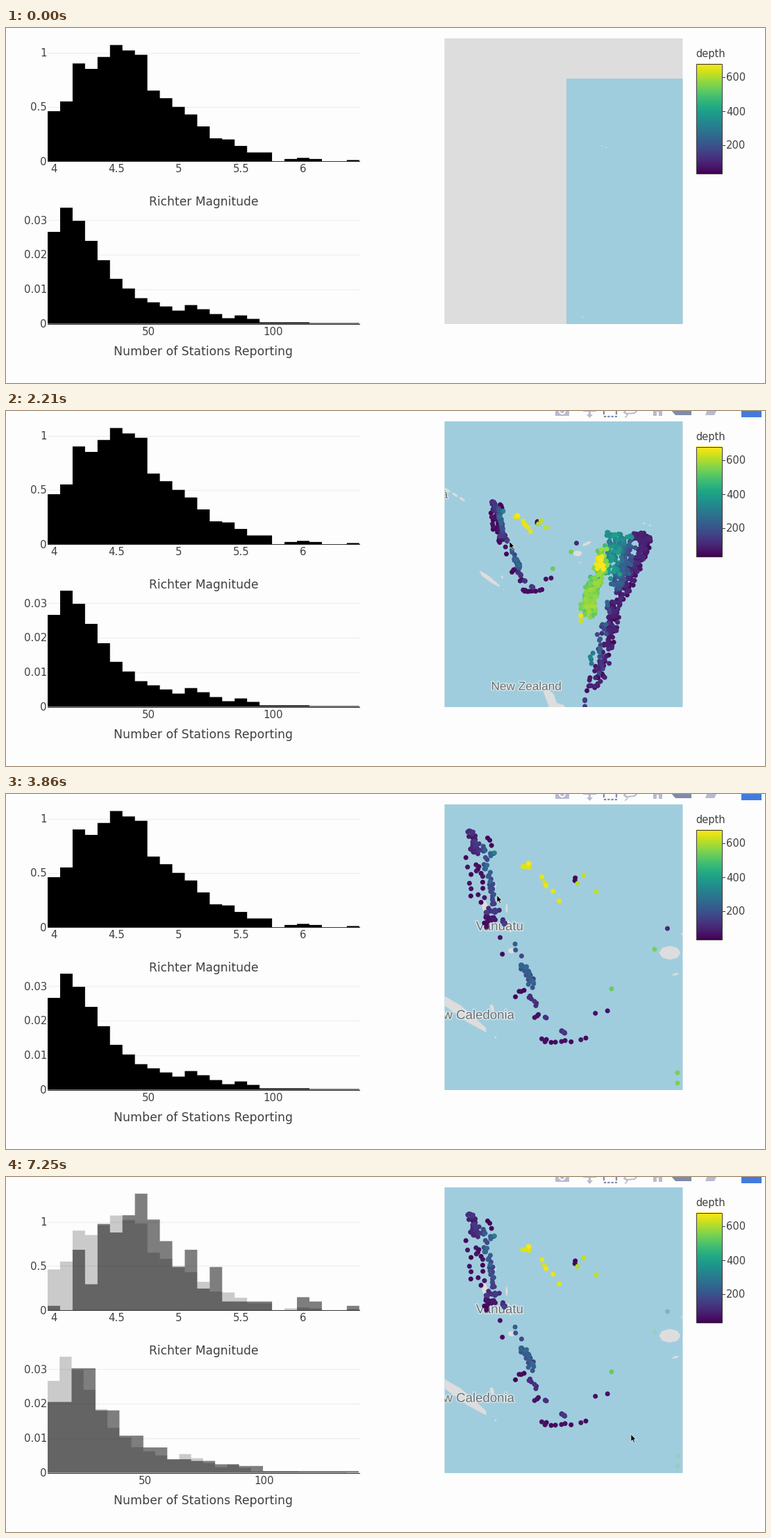
A matplotlib script that plays this animation: 1093 px wide and 512 px high, repeating every 8000 ms.

```python
import numpy as np
import matplotlib.pyplot as plt
from matplotlib.animation import FuncAnimation
from matplotlib.collections import PolyCollection
from matplotlib.patches import Circle, Polygon, Rectangle
from matplotlib.patheffects import withStroke

W, H, DPI = 1093, 512, 64
PT = 72 / DPI                      # points per pixel
LOOP, STEP = 8000, 50
BG, SEA, LAND, INK = "#fdfdfd", "#a0cddd", "#dddddd", "#404040"
MAP = (631.5, 15, 343, 412)
ANCHOR = np.array([725.0, 188.0])  # zoom centre on the map
FAR = 0.293                        # zoom of the overview

rng = np.random.default_rng(7)
fig = plt.figure(figsize=(W / DPI, H / DPI), dpi=DPI, facecolor=BG)
ax = fig.add_axes([0, 0, 1, 1])
ax.axis("off")

# ---- colour bar ----
ax.imshow(np.linspace(1, 0, 160)[:, None], extent=(994, 1031, 210, 51),
          cmap="viridis", aspect="auto", zorder=2)
ax.set_xlim(0, W)
ax.set_ylim(H, 0)


def text(x, y, s, size=15, ha="center", font="DejaVu Sans", color=INK, **kw):
    return ax.text(x, y, s, size=size * PT, ha=ha, va="baseline",
                   family=font, color=color, **kw)


def line(xs, ys, color, width=1, **kw):
    return ax.plot(xs, ys, color=color, lw=width * PT, **kw)[0]


def rect(x, y, w, h, color, **kw):
    return ax.add_patch(Rectangle((x, y), w, h, fc=color, lw=0, snap=False, **kw))


def poly(pts, color):
    return ax.add_patch(Polygon(pts, fc=color, lw=0))


def show(group, on):
    for a in group:
        a.set_visible(on)


ax.add_patch(Rectangle((993.5, 51.5), 37, 158, fill=False, ec=INK, lw=PT, zorder=3))
text(993, 42, "depth", 14.6, "left")
for depth in (200, 400, 600):
    y = 218 - 0.245 * depth
    line([1031, 1035], [y, y], INK)
    text(1037, y + 5.5, str(depth), 14.8, "left")

# ---- histograms ----
X0, X1, BASE1, BASE2 = 60, 509, 192, 426.5


def hist(knots, unit, base, width, alpha):
    """Bars through a few known counts, linear in between."""
    n = max(knots) + 1
    counts = np.interp(range(n), list(knots), list(knots.values())).round()
    edges = np.minimum(X0 + width * np.arange(n + 1), X1)
    return ax.stairs(base - unit * counts, edges, baseline=base, fill=True,
                     color="black", alpha=alpha, lw=0, zorder=2, snap=False)


def y_tick(y, label):
    return [line([X0, X1], [y, y], "#eeeeee", 1.2, zorder=1),
            text(59, y + 5.5, label, ha="right")]


mag = {0: 46, 1: 55, 2: 90, 3: 85, 5: 107, 7: 98, 8: 65, 11: 43, 13: 21,
       14: 20, 16: 8, 17: 8, 18: 0, 20: 3, 22: 0, 23: 0, 24: 1}
mag_sel = {0: 1, 1: 0, 2: 14, 3: 6, 4: 20, 5: 18, 7: 27, 10: 10, 11: 14,
           12: 5, 13: 10, 14: 2, 17: 2, 18: 0, 19: 0, 20: 3, 22: 0, 23: 0, 24: 1}
stations = {0: 133, 1: 168, 2: 149, 4: 92, 5: 65, 7: 37, 10: 19, 11: 27,
            14: 8, 15: 12, 17: 2, 24: 1}
stations_sel = {0: 42, 1: 62, 2: 37, 3: 22, 5: 8, 8: 4, 9: 1, 12: 1}

for v in (1, 2, 3):
    y_tick(BASE2 - 49.8 * v, f"0.0{v}")
for base in (BASE1, BASE2):
    line([X0, X1], [base, base], "#333333", zorder=3)
    text(59, base + 5.5, "0", ha="right")
for i in range(5):
    text(69 + 89.75 * i, 208, f"{4 + i / 2:g}")
text(284.5, 256, "Richter Magnitude", 17.15)
text(284, 472, "Number of Stations Reporting", 17.3)

before = [hist(mag, 1.565, BASE1, 17.95, 1), hist(stations, 0.996, BASE2, 17.95, 1),
          text(205.5, 443, "50"), text(385, 443, "100")]
before += y_tick(35.5, "1") + y_tick(113.7, "0.5")
after = [hist(mag, 1.275, BASE1, 17.95, .2), hist(mag_sel, 6.22, BASE1, 17.95, .5),
         hist(stations, 0.996, BASE2, 17.22, .2),
         hist(stations_sel, 2.43, BASE2, 34.45, .5),
         text(200, 443, "50"), text(372, 443, "100")]
after += y_tick(64.8, "1") + y_tick(128.4, "0.5")

# ---- map ground ----
back = rect(*MAP, SEA, zorder=1)
tile = rect(807, 73, 167.5, 354, SEA, zorder=1)
frame = Rectangle(MAP[:2], *MAP[2:], transform=ax.transData)


def view(p, zoom):
    return ANCHOR + (np.asarray(p, float) - ANCHOR) * zoom


def from_far(p):
    return view(p, 1 / FAR)


def islet(x, y, w, h, tilt=0):
    a = np.linspace(0, 2 * np.pi, 9)[:-1]
    px, py = np.cos(a) * w / 2, np.sin(a) * h / 2
    c, s = np.cos(np.radians(tilt)), np.sin(np.radians(tilt))
    return np.column_stack([x + c * px - s * py, y + s * px + c * py])


caledonia = [(622, 286), (655, 305), (691, 337), (692, 344), (664, 329), (630, 304)]
north = [(756, 330), (769, 340), (772, 349), (779, 351), (785, 360), (792, 361),
         (783, 374), (773, 396), (766, 401), (769, 386), (762, 377), (769, 366)]
south = [(764, 399), (770, 403), (745, 428), (712, 436), (735, 409)]
shapes = [np.array(caledonia), from_far(north), from_far(south),
          islet(700, 309, 6, 12, -15), islet(705, 351, 3, 3),      # Loyalty
          islet(690, 163, 9, 22, -15), islet(702, 181, 8, 7),      # Vanuatu
          islet(721, 165, 3, 14), islet(725, 191, 4, 20, -12),
          islet(728, 226, 10, 8), islet(751, 267, 5, 7), islet(705, 131, 2, 9),
          islet(956, 229, 31, 20), islet(964, 260, 10, 3, -15),    # Fiji
          islet(987, 196, 34, 10, -25)]
for k in range(6):                                                 # Solomons
    shapes.append(from_far(islet(642 + 7.2 * k, 124 + 4.4 * k, 7, 2.5, 35)))
for x, y in [(859, 170), (864.5, 172), (831, 417)]:
    shapes.append(from_far(islet(x, y, 3, 1.3, 15)))
land = ax.add_collection(PolyCollection(shapes, fc=LAND, ec="none", zorder=2))
land.set_clip_path(frame)


def place(x, y, s, size, ha="center"):
    t = text(x, y, s, size, ha, "Liberation Sans", "#6c7073", zorder=3,
             path_effects=[withStroke(linewidth=2.6 * PT, foreground="#e2ebee")])
    t.set_clip_path(frame)
    t.set_clip_on(True)
    t.home = np.array([x, y - 6.0])
    return t


far_names = [place(749.5, 402.5, "New Zealand", 17.2),
             place(637, 126, "Papua New Guinea", 17.2, "right")]
near_names = [place(711, 196.5, "Vanuatu", 18.7),
              place(669, 324.5, "New Caledonia", 18.6),
              place(986, 242.5, "Fiji", 18.6)]

# ---- quakes: places at zoom 1 and depths ----
points, depths = [], []


def add(pts, lo, hi):
    points.extend(np.asarray(pts, float))
    depths.extend(rng.uniform(lo, hi, len(pts)))


def scatter(path, n, spread):
    """n seeded places, spread evenly along a polyline with some jitter."""
    p, k = np.array(path, float), np.arange(len(path))
    u = (np.arange(n) + .5) / n * (len(path) - 1)
    mid = np.column_stack([np.interp(u, k, p[:, 0]), np.interp(u, k, p[:, 1])])
    return mid + np.clip(rng.normal(size=(n, 2)), -1.6, 1.6) * spread


def near(path, n, spread, lo, hi):
    add(scatter(path, n, spread), lo, hi)


def far(path, n, spread, lo, hi):
    p = scatter(path, n, spread)
    p[:, 0] = np.maximum(p[:, 0], 800)
    add(from_far(p), lo, hi)


# western arc, north to south
near([(664, 54), (674, 56)], 5, (1, 1.5), 100, 170)
near([(672, 64), (677, 74), (676, 84)], 24, (5, 3), 45, 150)
near([(693, 60), (697, 69), (703, 91)], 4, (1, 1), 42, 75)
near([(664, 86), (668, 124), (670, 150)], 6, (1.5, 2), 42, 75)
near([(679, 98), (684, 122), (685, 160)], 11, (3, 2), 42, 75)
near([(689, 75), (694, 92), (692, 110), (698, 128)], 18, (3, 3), 170, 270)
near([(703, 85), (704, 85)], 1, 0, 320, 340)
near([(699, 128), (703, 158)], 15, (1.8, 2), 130, 220)
near([(692, 167), (708, 171)], 9, (3, 2.5), 80, 160)
near([(690, 178), (703, 180)], 13, (2, 3), 42, 80)
near([(689, 186), (691, 191)], 3, (2, 1), 42, 75)
near([(715, 180), (718, 190)], 4, (1, 1), 100, 190)
near([(711, 195), (715, 243)], 2, (.5, 0), 42, 75)
near([(732, 212), (741, 238)], 3, (2, 0), 160, 240)
near([(740, 247), (749, 252), (755, 266), (758, 278)], 24, (3.5, 3.5), 140, 265)
near([(733, 290), (748, 284)], 4, (1, 3), 42, 75)
near([(754, 289), (763, 307)], 6, (2, 1), 90, 150)
near([(760, 323), (768, 319)], 3, (1, 1), 42, 75)
near([(776, 321), (779, 324)], 3, (.5, .5), 100, 150)
near([(799, 343), (805, 345)], 6, (1, 1.5), 100, 150)
near([(773, 351), (781, 360), (807, 357), (842, 353)], 10, (2, 1), 42, 75)
near([(840, 318), (875, 311)], 2, 0, 42, 75)
near([(952, 194), (953, 194)], 1, 0, 110, 120)
# deep quakes to the east
near([(743, 107), (752, 103), (755, 106)], 7, (1, 2.5), 640, 675)
near([(770, 119), (778, 133), (800, 159)], 5, (2, 2), 635, 660)
add([(823, 129), (832, 117), (850, 141)], 600, 625)
near([(820, 119), (819, 127)], 2, 0, 42, 60)
add([(872, 281), (934, 224), (967, 402), (967, 417)], 530, 550)

# eastern trench, deep side to shallow side
far([(838, 183), (828, 198), (824, 222)], 75, (6, 3), 270, 400)
far([(845, 190), (838, 212), (832, 232)], 95, (4, 4), 170, 250)
far([(816, 198), (817, 214), (809, 232)], 70, (3.5, 4), 470, 590)
far([(813, 203), (816, 215)], 20, (2, 2), 640, 675)
far([(809, 232), (803, 245), (805, 261)], 100, (3.5, 3), 490, 600)
far([(820, 182), (832, 183)], 14, (3, 2), 300, 420)
far([(851, 182), (862, 186), (855, 204)], 85, (3, 2.5), 42, 110)
far([(855, 204), (845, 224), (835, 243)], 80, (3.5, 3), 42, 120)
far([(831, 248), (827, 272), (823, 295)], 70, (3, 3), 42, 110)
far([(822, 298), (815, 318), (806, 336)], 38, (4, 2), 42, 110)
far([(827, 248), (819, 274), (814, 296), (815, 320)], 28, (2.5, 4), 110, 250)
far([(807, 297), (806, 312)], 4, (1, 1), 240, 380)
far([(797, 343), (787, 354), (779, 365), (789, 361)], 9, (1.5, 1.5), 60, 150)
add(from_far([(796, 262), (796, 267)]), 610, 670)

order = np.argsort(depths)
points, depths = np.array(points)[order], np.array(depths)[order]
colors = plt.get_cmap("viridis")((depths - 40) / 640)
quakes = ax.scatter(points[:, 0], points[:, 1], s=(7 * PT) ** 2, c=colors,
                    linewidths=0, zorder=4)
quakes.set_clip_path(frame)

# ---- toolbar, cut by the top edge ----
LIGHT, DARK, BLUE = "#b6bccf", "#7f8ba8", "#447adb"
bar = [
    rect(791, -6, 20, 13, LIGHT),
    ax.add_patch(Circle((801, 0), 5, fc=BG, lw=0)),
    ax.add_patch(Circle((801, 0), 3, fc=LIGHT, lw=0)),
    rect(839, -8, 3, 13, LIGHT), rect(831, -2, 19, 3, LIGHT),
    poly([(836, 5), (845, 5), (840.5, 10)], LIGHT),
    line([861, 880], [8, 8], DARK, 2.2, dashes=(1.5, .9)),
    line([861, 861], [0, 4], DARK, 2.2), line([879, 879], [0, 4], DARK, 2.2),
    line([892, 890, 893, 905, 909], [0, 2, 4, 3, -1], LIGHT, 2),
    line([893, 895, 892], [3, 6, 9], LIGHT, 1.6),
    rect(932, -4, 5, 11, LIGHT), rect(940, -4, 5, 11, LIGHT),
    rect(932, -4, 13, 5, LIGHT),
    poly([(957, -2), (964, 6), (987, 6), (987, -2)], DARK),
    poly([(1007, 6), (1010, -2), (1024, -2), (1020, 6)], LIGHT),
    rect(1059, -20, 29, 29, BLUE),
]

# ---- selection and pointer ----
outline = [line([], [], "white", 1.8, zorder=5),
           line([], [], "black", 1.8, zorder=6, dashes=(1.6, 1.2))]
ARROW = np.array([(0, 0), (0, 10.5), (2.4, 8.3), (4, 12), (5.6, 11.3),
                  (4.1, 7.7), (7.3, 7.7)])
pointer = ax.add_patch(Polygon(ARROW, fc="black", ec="white", lw=.6 * PT, zorder=7))

# ---- timeline: motion is sampled in bursts of even ticks ----
BURSTS = [(870, 150, 8), (2210, 150, 8), (3860, 150, 6), (4900, 160, 7), (6110, 170, 4)]
TICKS = [a + gap * k for a, gap, n in BURSTS for k in range(n)]
ZOOM = {2060: FAR, 2660: 1.29, 2810: 1.42, 3260: 1}
HOVER = {870: (900, 60), 1320: (731, 163), 1620: (706, 198), 1920: (725, 188),
         3710: (725, 188), 3860: (707, 146), 4310: (651, 26), 4610: (645, 31)}
DRAG = {4900: (651, 40), 5220: (718, 119), 5380: (775, 220), 5540: (808, 272),
        5860: (850, 325), 6110: (882, 364), 6620: (899, 369)}
START = np.array([645, 31])


def along(path, t):
    xy = np.array(list(path.values()), float)
    return np.array([np.interp(t, list(path), c) for c in xy.T])


def draw(i):
    t = i * STEP + STEP - 1
    n = int(np.searchsorted(TICKS, t, "right")) - 1
    now, last = TICKS[max(n, 0)], TICKS[max(n - 1, 0)]
    loaded, dragged = t >= 150, t >= 4900
    dragging = dragged and t < 7070

    back.set_facecolor(SEA if loaded else LAND)
    tile.set_visible(not loaded)
    zoom = np.exp(np.interp(now, list(ZOOM), np.log(list(ZOOM.values()))))
    land.set_verts([view(p, zoom) for p in shapes])
    show(far_names, loaded and zoom < .6)
    show(near_names, zoom >= .6)
    for name in near_names:
        name.set_position(view(name.home, zoom) + (0, 6))

    quakes.set_visible(t >= 510)
    quakes.set_offsets(view(points, zoom))
    rgba = colors.copy()
    if dragged:
        # highlighting trails the outline by one tick
        reach = along(DRAG, last)
        rgba[~((points >= START) & (points <= reach)).all(axis=1), 3] = .2
    quakes.set_facecolors(rgba)

    (x0, y0), (x, y) = START + .5, along(DRAG, now) + .5
    for edge in outline:
        edge.set_data([x0, x, x, x0, x0], [y0, y0, y, y, y0])
    show(outline, dragging)
    tip = along(DRAG, now + 40) + (1, 2) if dragged else along(HOVER, now)
    pointer.set_xy(ARROW + tip)
    pointer.set_visible(n >= 0)

    show(bar, n >= 0 and not dragging)
    show(before, t < 7250)
    show(after, t >= 7250)
    return []


anim = FuncAnimation(fig, draw, frames=LOOP // STEP, interval=STEP,
                     init_func=lambda: [], repeat=True, repeat_delay=0, blit=False)
plt.show()
```
